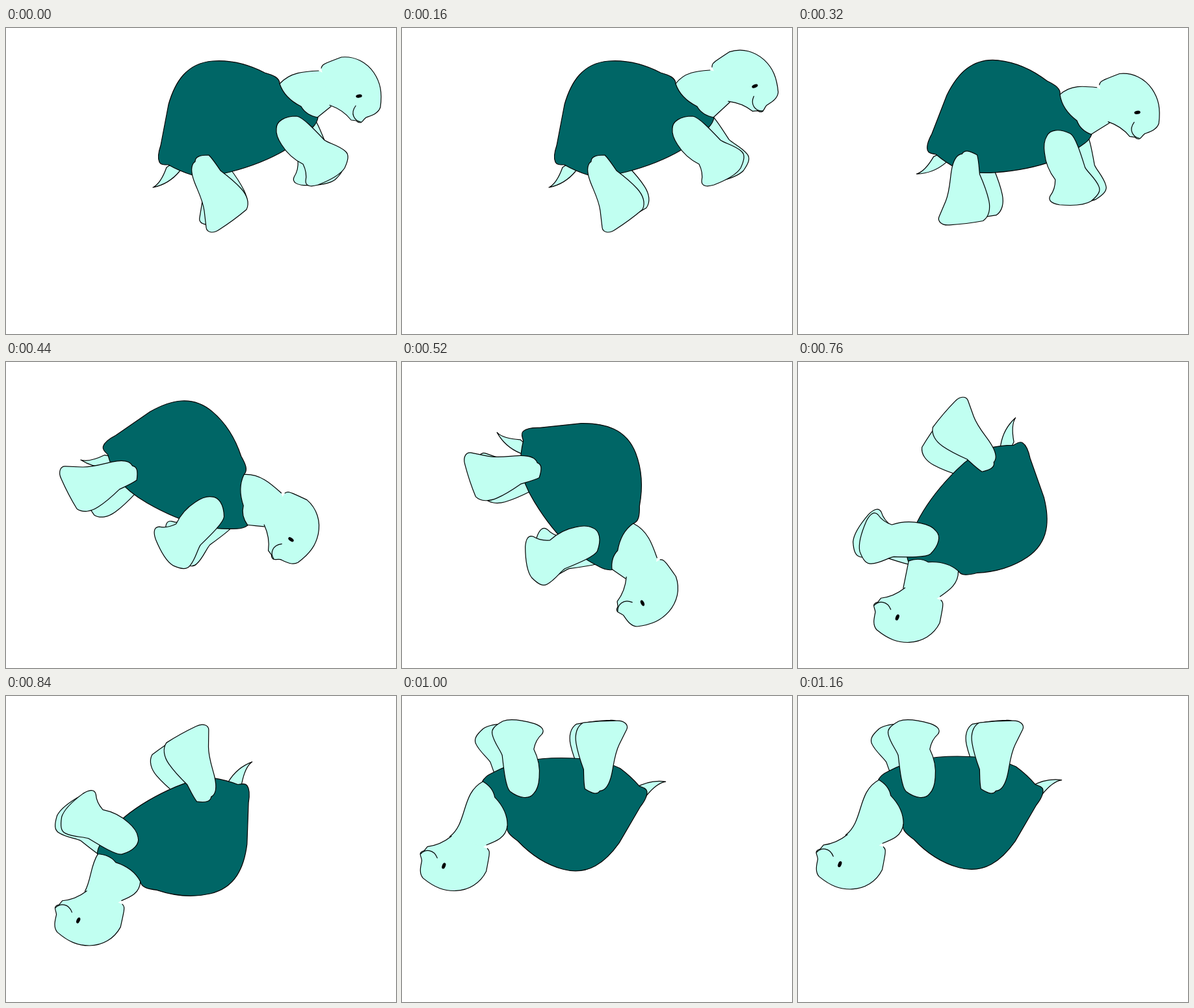
These frames come from a looping animation (600 px wide and 472 px high, 1240 ms). An HTML page with a canvas:

```html
<!DOCTYPE html>
<html lang="en">
<head>
<meta charset="utf-8">
<title>Tumbling turtle</title>
<style>
html, body { margin: 0; width: 100%; height: 100%; overflow: hidden; background: #fff; }
canvas { display: block; }
</style>
</head>
<body>
<canvas id="stage" width="600" height="472"></canvas>
<script>
const ctx = document.getElementById('stage').getContext('2d');
const LOOP = 1240;
const SKIN = '#c1fff1', SHELL = '#006666';

// Outlines, all drawn in the upright pose
const shape = {
  shell: new Path2D('M480 138C479 144 476 149 472 153C458 168 446 179 430 188C408 201 380 213 345 222' +
    'C322 228 303 229 287 227C274 223 262 218 250 211C243 211 238 211 236 207C233 201 235 190 238 181' +
    'L250 118C260 83 278 54 318 51C346 49 371 55 398 69C412 73 421 77 421 86C427 104 440 114 454 121' +
    'C459 130 469 136 480 138Z'),
  tail: new Path2D('M253 211L247 215C242 229 236 241 226 246C245 242 258 232 267 221L275 210Z'),
  front: new Path2D('M416 155C416 144 428 136 447 136C456 137 474 156 490 173C497 178 512 181 522 190' +
    'C528 195 527 203 521 216C514 227 498 235 480 242C470 245 461 245 461 236C463 226 461 218 457 210' +
    'C443 203 432 193 424 180C418 171 415 163 416 155Z'),
  hind: new Path2D('M291 206C291 199 297 196 312 196C319 203 325 213 330 220C342 229 352 237 362 248' +
    'C371 258 375 270 370 280C357 291 342 302 328 311C318 318 309 315 308 308L305 282' +
    'C303 266 295 251 290 238C284 222 284 211 291 206Z'),
  head: new Path2D('M485 62C486 57 489 56 493 54C500 51 508 48 516 45C537 43 555 53 566 69' +
    'C576 84 579 99 576 122C573 132 562 135 554 138C549 142 548 146 545 146C541 146 540 144 539 143' +
    'L531 142C524 133 515 125 498 119'),
  mouth: new Path2D('M546 145C536 143 529 132 538 120')
};

// Times of the main poses; each track below has one value per pose
const KEYS = [0, 240, 440, 600, 760, 1000];
const roll = {
  x: [357.5, 357.5, 261, 253.5, 258.5, 250.5],
  y: [171.5, 171.5, 190, 230.5, 216.5, 140.5],
  deg: [0, 0, 44.5, 103.7, 149.8, 199.4]
};
const still = KEYS.map(() => 0);

// turn: degrees against the shell; lag: extra degrees of the far twin;
// land: how far the joint has slipped once the turtle lies on its back
const limbs = {
  head: { joint: [473, 98], land: [-2, -36], turn: [0, -17, 1.5, 2.8, -28, -77.7] },
  tail: { joint: [257, 218], land: [-12, -15], turn: still },
  front: { joint: [424, 142], land: [-13, -6], turn: [0, 0, 44.5, 24, -15, 17.6], lag: [22, 7, 8, 22, 17, -13] },
  hind: { joint: [299, 199.5], land: [15, -20], turn: [0, 0, 54.5, 15.3, 17, 13.6], lag: [16, 5, -3, 19, -6, -3] }
};
const FAR = [20, -13];

const ramp = (t, from, to) => {
  const u = Math.min(1, Math.max(0, (t - from) / (to - from)));
  return u * u * (3 - 2 * u);
};

// Smooth curve through the values that never overshoots them
function track(v, t) {
  const i = KEYS.findLastIndex(k => k <= t);
  if (i === KEYS.length - 1) return v[i];
  const slope = j => (v[j + 1] - v[j]) / (KEYS[j + 1] - KEYS[j]);
  const tangent = j => {
    const a = slope(j - 1), b = slope(j);
    return a * b > 0 ? 2 * a * b / (a + b) : 0;
  };
  const span = KEYS[i + 1] - KEYS[i], u = (t - KEYS[i]) / span, w = 1 - u;
  return v[i] * w * w * (1 + 2 * u) + v[i + 1] * u * u * (3 - 2 * u) +
    span * u * w * (tangent(i) * w - tangent(i + 1) * u);
}

const shellPose = t => new DOMMatrix()
  .translate(track(roll.x, t), track(roll.y, t))
  .rotate(track(roll.deg, t))
  .translate(-357.5, -171.5);

function limbPose(name, body, t, far = false) {
  const { joint: [x, y], land, turn, lag } = limbs[name];
  const down = ramp(t, 760, 1000);
  const gap = far ? 1 - 0.8 * down : 0;
  return body
    .translate(x + land[0] * down + FAR[0] * gap, y + land[1] * down + FAR[1] * gap)
    .rotate(track(turn, t) + (far ? track(lag, t) : 0))
    .translate(-x, -y);
}

function part(name, pose, fill = SKIN) {
  ctx.setTransform(pose);
  ctx.fillStyle = fill;
  ctx.fill(shape[name]);
  ctx.stroke(shape[name]);
}

function at(pose, x, y) {
  const p = pose.transformPoint({ x, y });
  return [p.x, p.y];
}

// Cubic from p to q, bent sideways by a and b at its thirds
function bend(p, q, a, b) {
  const dx = q[0] - p[0], dy = q[1] - p[1], len = Math.hypot(dx, dy);
  const knot = (u, d) => [p[0] + dx * u + dy / len * d, p[1] + dy * u - dx / len * d];
  return [p, knot(1 / 3, a), knot(2 / 3, b), q];
}

function neck(body, head, t) {
  const down = ramp(t, 760, 1000);
  const top = bend(at(body, 421, 86), at(head, 481, 66), 12, 6);
  const low = bend(at(body, 479, 138), at(head, 500, 121), -20 * down, 13 * down);

  ctx.resetTransform();
  ctx.fillStyle = SKIN;
  ctx.beginPath();
  ctx.moveTo(...top[0]);
  ctx.bezierCurveTo(...top[1], ...top[2], ...top[3]);
  ctx.lineTo(...at(head, 530, 90));
  ctx.lineTo(...low[3]);
  ctx.bezierCurveTo(...low[2], ...low[1], ...low[0]);
  ctx.lineTo(...at(body, 430, 130));
  ctx.fill();

  for (const [p, a, b, q] of [top, low]) {
    ctx.beginPath();
    ctx.moveTo(...p);
    ctx.bezierCurveTo(...a, ...b, ...q);
    ctx.stroke();
  }
}

function face(pose) {
  part('head', pose);
  ctx.stroke(shape.mouth);
  ctx.fillStyle = '#000';
  ctx.beginPath();
  ctx.ellipse(543, 105, 4.8, 2.6, -0.17, 0, Math.PI * 2);
  ctx.fill();
}

function draw(t) {
  ctx.resetTransform();
  ctx.clearRect(0, 0, 600, 472);
  ctx.strokeStyle = '#000';
  ctx.lineWidth = 1.2;
  ctx.lineCap = ctx.lineJoin = 'round';

  // At rest the body lifts a little while the legs stay put
  const base = shellPose(t);
  const body = new DOMMatrix().translate(0, -2.5 * ramp(t, 1000, 1160)).multiply(base);
  const head = limbPose('head', body, t);
  const legs = ['front', 'hind'];

  for (const leg of legs) part(leg, limbPose(leg, base, t, true));
  part('tail', limbPose('tail', body, t));
  neck(body, head, t);
  face(head);
  part('shell', body, SHELL);
  for (const leg of legs) part(leg, limbPose(leg, base, t));
}

// Pictures change every 80 ms, with one short step at 360
function step(t) {
  const shift = t < 360 ? 0 : 40;
  return Math.floor((t - shift) / 80) * 80 + shift;
}

const start = performance.now();
function tick() {
  draw(step((performance.now() - start) % LOOP));
  requestAnimationFrame(tick);
}
tick();
</script>
</body>
</html>
```
